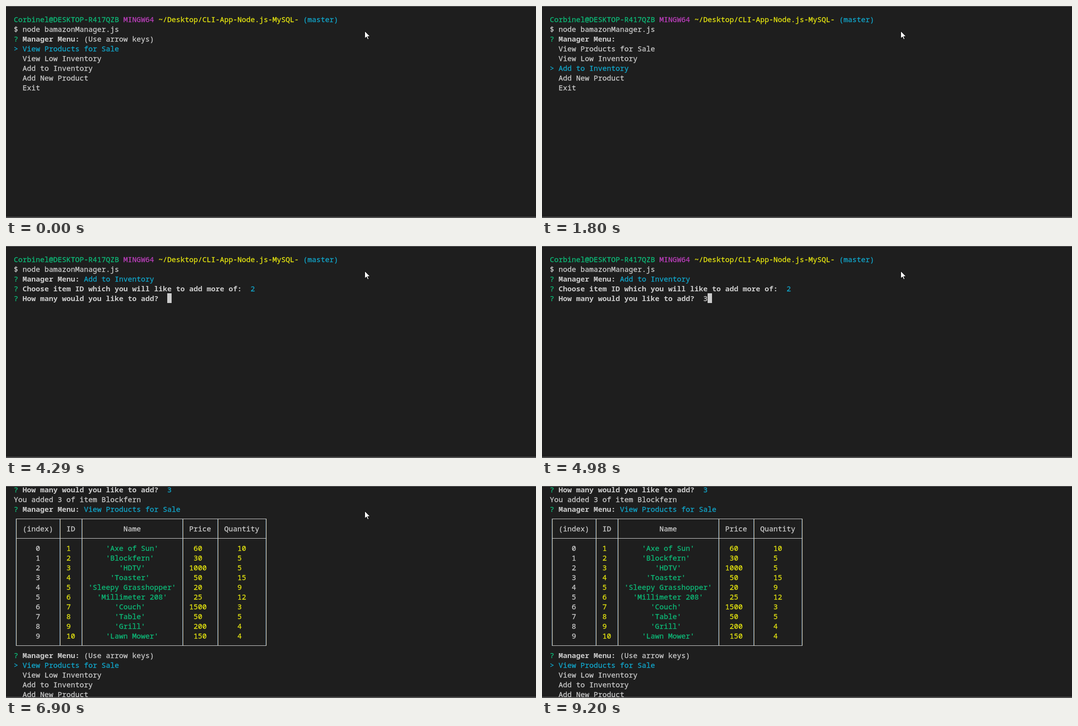
Write an HTML page that moves like this. It is 1088x435 px and loops after 9.72 s.

```html
<!DOCTYPE html>
<html lang="en">
<head>
<meta charset="utf-8">
<title>Manager menu in a terminal</title>
<style>
html, body { margin: 0; width: 100%; height: 100%; overflow: hidden; background: #1e1e1e; }
svg { display: block; width: 100vw; height: 100vh; }
text { font: 15px "Noto Sans Mono", "DejaVu Sans Mono", monospace; white-space: pre; stroke-width: .3; }
.b { font-weight: 700; stroke-width: 0; }
</style>
</head>
<body>
<svg viewBox="0 0 1088 435" preserveAspectRatio="none">
  <defs><clipPath id="view"><rect y="1" width="1088" height="432"/></clipPath></defs>
  <rect width="1088" height="435" fill="#1e1e1e"/>
  <g id="screen" clip-path="url(#view)"></g>
  <path d="M0 .5H1088" stroke="#707070"/>
  <path d="M0 433.5H1088" stroke="#8c8c8c"/>
  <path id="mouse" d="M.5 .5V15.6L4 12.3L6.4 17.6L8.7 16.6L6.4 11.6H11.3Z" fill="#fff" stroke="#000" stroke-width=".9"/>
</svg>
<script>
const LOOP = 9720, CELL = 9, LINE = 20, LEFT = 16, TOP = 17;
const WHITE = '#cccccc', GREEN = '#0dbc79', CYAN = '#11a8cd', YELLOW = '#e5e510', PURPLE = '#bc3fbc';
const screen = document.getElementById('screen');
const mouse = document.getElementById('mouse');

const colX = col => LEFT + col * CELL;
const rowY = row => TOP + row * LINE;

function put(row, col, text, color = WHITE, bold = false) {
  return `<text x="${colX(col)}" y="${rowY(row) + 16}" fill="${color}" stroke="${color}"${bold ? ' class="b"' : ''}>${text}</text>`;
}

const block = (row, col) =>
  `<rect x="${colX(col)}" y="${rowY(row)}" width="${CELL}" height="${LINE}" fill="${WHITE}"/>`;

function ask(row, question, answer = '', color = CYAN) {
  return put(row, 0, '?', GREEN) + put(row, 2, question, WHITE, true) +
    put(row, 3 + question.length, answer, color);
}

const OPTIONS = ['View Products for Sale', 'View Low Inventory', 'Add to Inventory', 'Add New Product', 'Exit'];
const MENU = 'Manager Menu:', ITEM = 'Choose item ID which you will like to add more of: ',
  AMOUNT = 'How many would you like to add? ';

function menu(row, picked, hint = '') {
  return ask(row, MENU, hint, WHITE) + OPTIONS.map((name, i) => {
    const on = i === picked, y = row + 1 + i;
    return (on ? put(y, 0, '&gt;', CYAN) : '') + put(y, 2, name, on ? CYAN : WHITE);
  }).join('');
}

const HINT = '(Use arrow keys)';
const added = row => put(row, 0, 'You added 3 of item Blockfern');

const prompt = put(0, 0, 'Corbinel@DESKTOP-R417QZB', GREEN) + put(0, 25, 'MINGW64', PURPLE) +
  put(0, 33, '~/Desktop/CLI-App-Node.js-MySQL-', YELLOW) + put(0, 66, '(master)', CYAN) +
  put(1, 0, '$ node bamazonManager.js');

const WIDTHS = [9, 4, 22, 7, 10];
const HEADS = ['(index)', 'ID', 'Name', 'Price', 'Quantity'];
const GOODS = [
  ['Axe of Sun', 60, 10], ['Blockfern', 30, 5], ['HDTV', 1000, 5], ['Toaster', 50, 15],
  ['Sleepy Grasshopper', 20, 9], ['Millimeter 208', 25, 12], ['Couch', 1500, 3],
  ['Table', 50, 5], ['Grill', 200, 4], ['Lawn Mower', 150, 4]
];

// Cells are centred by whole characters, rounding to the left.
function cells(row, values, colors) {
  let col = 1;
  return values.map((value, i) => {
    const text = String(value), at = col + Math.floor((WIDTHS[i] - text.length) / 2);
    col += WIDTHS[i] + 1;
    return put(row, at, text, colors[i]);
  }).join('');
}

function table(row) {
  const last = row + GOODS.length + 3;
  const edges = [0];
  WIDTHS.forEach(w => edges.push(edges[edges.length - 1] + w + 1));
  const mid = r => rowY(r) + 10.5, centre = c => colX(c) + 4.5;
  const across = [row, row + 2, last].map(r => `M${centre(0)} ${mid(r)}H${centre(57) + 1}`).join('');
  // Subpixel rendering splits each upright into a cool and a warm pixel.
  const uprights = (shift, color) => `<path stroke="${color}" d="${
    edges.map(c => `M${centre(c) + shift} ${mid(row)}V${mid(last)}`).join('')}"/>`;
  return uprights(0, '#6a8fb4') + uprights(1, '#c9b48c') +
    `<path d="${across}" stroke="${WHITE}"/>` +
    cells(row + 1, HEADS, []) +
    GOODS.map(([name, price, count], i) => cells(row + 3 + i,
      [i, i + 1, `'${name}'`, price, count], [WHITE, YELLOW, GREEN, YELLOW, YELLOW])).join('');
}

const chosen = prompt + ask(2, MENU, OPTIONS[2]);
const item = chosen + ask(3, ITEM, '2');
const scenes = [
  [0, prompt + menu(2, 0, HINT)],
  [810, prompt + menu(2, 1)],
  [1800, prompt + menu(2, 2)],
  [2740, chosen + ask(3, ITEM) + block(3, 54)],
  [3420, chosen + ask(3, ITEM, '2', WHITE) + block(3, 55)],
  [4290, item + ask(4, AMOUNT) + block(4, 35)],
  [4980, item + ask(4, AMOUNT, '3', WHITE) + block(4, 36)],
  [5720, item + ask(4, AMOUNT, '3') + added(5) + menu(6, 0, HINT)],
  [6900, ask(-1, AMOUNT, '3') + added(0) + ask(1, MENU, OPTIONS[0]) + table(2) + menu(16, 0, HINT)]
];

// Pointer stops: time, x, y. It leaves the picture after the last one.
const stops = [
  [0, 736, 51], [7990, 700, 88], [8110, 645, 148], [8260, 635, 154], [8380, 619, 160],
  [8500, 604, 164], [8650, 583, 164], [8800, 572, 160], [8930, 560, 154], [9050, 547, 149]
];
const GONE = 9200;

const latest = (list, t) => list.filter(entry => entry[0] <= t).pop();

let shown;
function draw(t) {
  const scene = latest(scenes, t);
  if (scene !== shown) screen.innerHTML = scene[1];
  shown = scene;
  const [, x, y] = latest(stops, t);
  mouse.setAttribute('transform', `translate(${x} ${y})`);
  mouse.setAttribute('visibility', t < GONE ? 'visible' : 'hidden');
}

const start = performance.now();
function tick() {
  draw((performance.now() - start) % LOOP);
  requestAnimationFrame(tick);
}
tick();
</script>
</body>
</html>
```
